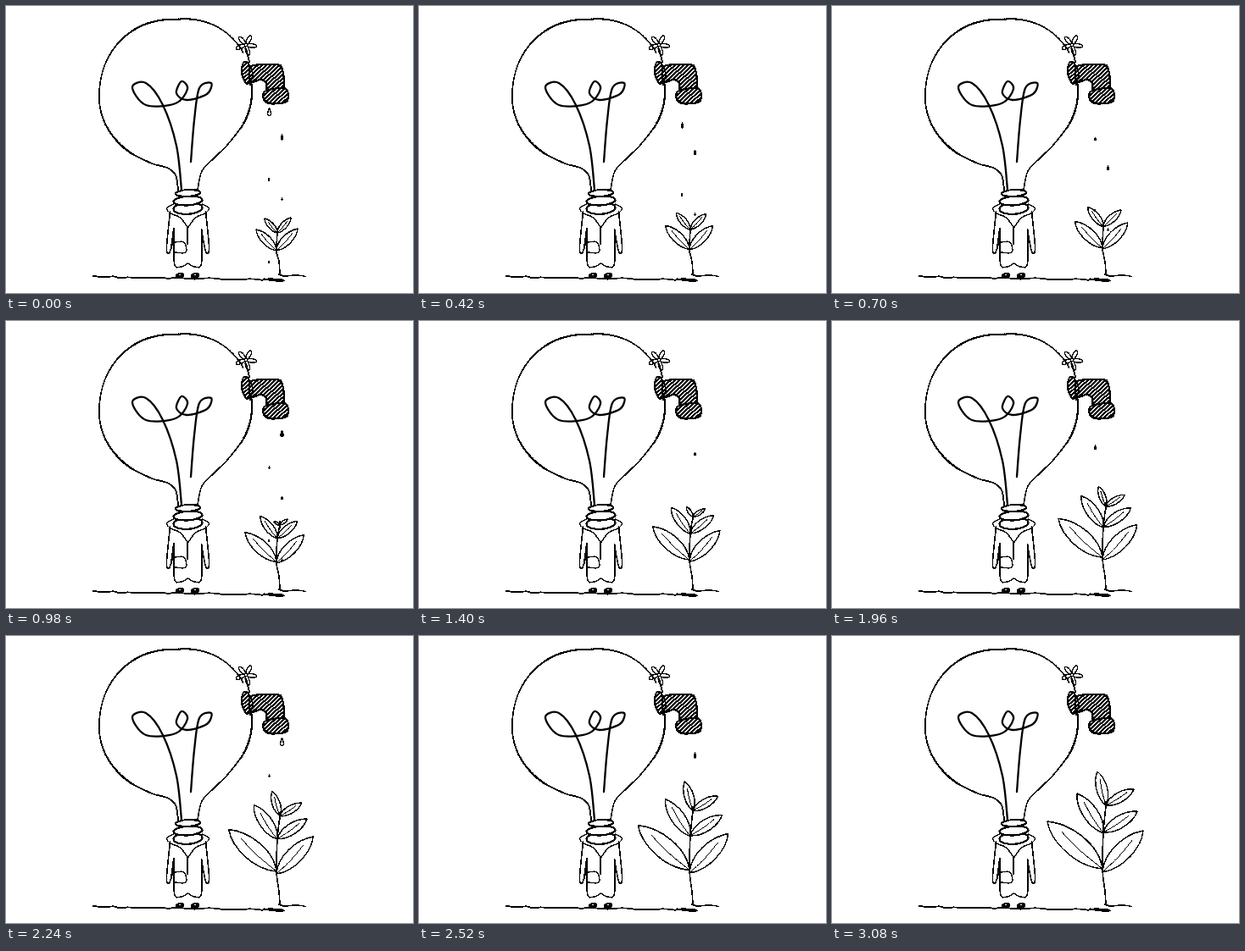
An HTML page with a canvas that plays this animation: 480x339 px, repeating every 3.22 s.

```html
<!DOCTYPE html>
<html lang="en">
<head>
<meta charset="utf-8">
<title>Bulb watering a plant</title>
<style>
html, body { margin: 0; width: 100%; height: 100%; overflow: hidden; background: #fff; }
canvas { display: block; width: 480px; height: 339px; }
</style>
</head>
<body>
<canvas id="c" width="480" height="339"></canvas>
<script>
const W = 480, H = 339, LOOP = 3220, STEP = 140;
const GROWN = 19;   // step at which the plant is full size
const PERIOD = 5;   // steps between two drops
const FALL = 8;     // pixels a drop falls per step

function makeContext(canvas) {
  canvas.width = W;
  canvas.height = H;
  const g = canvas.getContext('2d', { willReadFrequently: true });
  g.fillStyle = '#fff';
  g.fillRect(0, 0, W, H);
  g.strokeStyle = '#000';
  g.lineCap = g.lineJoin = 'round';
  return g;
}

function seeded(seed) {
  return () => (seed = seed * 16807 % 2147483647) / 2147483647;
}

// Smooth curve through a list of [x, y] points
function trace(g, p, closed) {
  const n = p.length;
  const at = i => closed ? p[(i + n) % n] : p[Math.max(0, Math.min(n - 1, i))];
  g.beginPath();
  g.moveTo(...p[0]);
  for (let i = 0; i < (closed ? n : n - 1); i++) {
    const a = at(i - 1), b = at(i), c = at(i + 1), d = at(i + 2);
    g.bezierCurveTo(b[0] + (c[0] - a[0]) / 6, b[1] + (c[1] - a[1]) / 6,
      c[0] - (d[0] - b[0]) / 6, c[1] - (d[1] - b[1]) / 6, ...c);
  }
}

function line(g, p, width, closed = false) {
  trace(g, p, closed);
  g.lineWidth = width;
  g.stroke();
}

function oval(g, x, y, rx, ry, turn, fill, width) {
  g.beginPath();
  g.ellipse(x, y, rx, ry, turn, 0, 2 * Math.PI);
  if (fill) { g.fillStyle = fill; g.fill(); }
  g.lineWidth = width;
  g.stroke();
}

// Turns soft edges into hard black ink
function harden(g, x, y, w, h) {
  const img = g.getImageData(x, y, w, h), d = img.data;
  for (let i = 0; i < d.length; i += 4)
    d[i] = d[i + 1] = d[i + 2] = d[i] < 140 ? 0 : 255;
  g.putImageData(img, x, y);
}

// Slightly lopsided circle of the bulb
function rim(a) {
  const s = Math.sin(2 * a);
  const r = 1 + Math.abs(s) * (.01 - .036 * Math.sin(a)) - .0195 * s;
  return [200 + 90 * r * Math.cos(a), 103 + 87 * r * Math.sin(a)];
}

function drawRim(g, from, to) {
  for (let a = from; a < to; a += .05)
    line(g, [rim(a), rim(Math.min(to, a + .05))], 1.8 + .4 * Math.sin(3 * a + 1));
}

function drawBulb(g) {
  const left = 2.15, right = .5;
  drawRim(g, left, 2 * Math.PI - .56);
  drawRim(g, -.12, right);
  line(g, [rim(left), [172, 186], [190, 191], [200, 200], [203, 217]], 1.8);
  line(g, [rim(right), [262, 163], [245, 180], [231, 195], [226, 217]], 1.6);
  for (let i = 2; i >= 0; i--)
    oval(g, 214.5, 221 + 9 * i, 14.5 + Math.min(i, 1) * 2.5, 4 + i * 1.4, -.06, '#fff', 2.2);
}

function drawFilament(g) {
  line(g, [[207, 217], [201, 165], [185, 117], [165, 91], [149, 96], [165, 117],
    [200, 115], [214, 98], [207, 89], [201, 103], [213, 111], [237, 104],
    [242, 91], [228, 97], [222, 135], [218, 184]], 2.3);
}

// The coat is symmetric, so each line is drawn twice
function drawCoat(g) {
  for (const side of [-1, 1]) {
    const half = (pts, width) => line(g, pts.map(([x, y]) => [214.5 + side * x, y]), width);
    half([[17, 234], [25, 239], [20, 245], [9, 250], [0, 262]], 1.4);
    half([[21, 243], [25, 286], [21, 290], [16, 264]], 1.5);
    half([[16, 264], [16, 304], [8, 308], [0, 304]], 1.4);
    oval(g, 214 + side * 9, 318.5, 5, 3, -.2, '#000', 1.2);
    g.fillStyle = '#fff';
    g.fillRect(213 + side * 9, 317, 2, 1);
  }
  line(g, [[198, 263], [195, 286]], 2);
  line(g, [[214, 262], [214, 282]], 1.4);
  line(g, [[198, 279], [210, 279], [212, 291], [199, 291]], 1.4);
}

function hatched(g, pts) {
  g.save();
  trace(g, pts, true);
  g.fillStyle = '#fff';
  g.fill();
  g.clip();
  for (let x = 200; x < 360; x += 5.2) line(g, [[x, 120], [x + 66, 60]], 2.1);
  g.restore();
  line(g, pts, 2, true);
}

function drawTap(g) {
  hatched(g, [[286, 72], [318, 69], [326, 75], [327, 100], [309, 101], [307, 91], [300, 87], [287, 90]]);
  hatched(g, [[305, 101], [328, 97], [333, 105], [329, 114], [307, 114]]);
  hatched(g, [[280, 67], [286, 68], [287, 86], [284, 92], [278, 80]]);
  line(g, [[287, 70], [291, 80], [288, 93]], 1.6);
  line(g, [[283, 50], [287, 66]], 1.6);
  for (let i = 0; i < 5; i++) {
    const a = 2.8 + 1.2 * i;
    oval(g, 283 + 7 * Math.cos(a), 46 + 7 * Math.sin(a), 5.5, 2.3, a, null, 1.3);
  }
}

function rough(g, x0, y0, x1, y1, width, seed) {
  const rnd = seeded(seed), pts = [];
  for (let x = x0; x <= x1; x += 8)
    pts.push([x, y0 + (y1 - y0) * (x - x0) / (x1 - x0) + (rnd() - .5) * 2]);
  line(g, pts, width);
}

const scene = document.createElement('canvas');
{
  const g = makeContext(scene);
  rough(g, 103, 320, 327, 323.5, 1.8, 11);
  rough(g, 304, 323, 328, 325, 1.5, 5);
  rough(g, 321, 318, 353, 319, 1.4, 7);
  drawBulb(g);
  drawCoat(g);
  drawTap(g);
  harden(g, 0, 0, W, H);
  drawFilament(g);
}

// Each leaf: first step, then tip x, tip y and base y when young and when grown
const leaves = [
  { born: 0, young: [295, 264, 289], grown: [254, 219, 275] },
  { born: 0, young: [344, 263, 289], grown: [367, 230, 279] },
  { born: 0, young: [305, 251, 268], grown: [289, 186, 233] },
  { born: 0, young: [336, 250, 268], grown: [360, 207, 232] },
  { born: 6, young: [316, 237, 241], grown: [313, 160, 200] },
  { born: 6, young: [332, 234, 241], grown: [356, 181, 200] }
];

function drawLeaf(x, y, tx, ty) {
  const dx = tx - x, dy = ty - y, side = dx < 0 ? 1 : -1;
  const at = (u, v) => [x + dx * u - dy * v * side, y + dy * u + dx * v * side];
  ctx.beginPath();
  ctx.moveTo(x, y);
  ctx.bezierCurveTo(...at(.25, .22), ...at(.72, .2), tx, ty);
  ctx.bezierCurveTo(...at(.78, -.18), ...at(.3, -.22), x, y);
  ctx.fillStyle = '#fff';
  ctx.fill();
  ctx.lineWidth = 1.4;
  ctx.stroke();
  if (Math.hypot(dx, dy) > 16) line(ctx, [[x, y], at(.4, -.01), at(.76, .02)], 1);
}

function drawPlant(n) {
  const stem = [[323, 317], [322, 302]];
  leaves.forEach(({ born, young, grown }, i) => {
    if (n < born) return;
    const k = Math.min(1, (n - born) / (GROWN - born));
    const [tx, ty, y] = young.map((v, j) => v + (grown[j] - v) * k);
    const x = [319, 320, 323][i >> 1];
    drawLeaf(x, y, tx, ty);
    if (i % 2) return;
    stem.push([x, y]);
    line(ctx, [[x, y + 3], [x, y - 4]], 2);
  });
  line(ctx, stem, 1.5);
}

function drawDrop(x, y, h) {
  const w = h * .55;
  ctx.beginPath();
  ctx.moveTo(x, y - h);
  ctx.bezierCurveTo(x + w * .5, y - h * .2, x + w * 1.5, y + h, x, y + h);
  ctx.bezierCurveTo(x - w * 1.5, y + h, x - w * .5, y - h * .2, x, y - h);
  ctx.fillStyle = h > 3.9 ? '#fff' : '#000';
  ctx.fill();
  ctx.lineWidth = 1.3;
  ctx.stroke();
}

function drawDrops(n) {
  // drops already in the air when the loop begins
  if (n < 8) [155, 205, 228, 302].forEach((y, i) => {
    y += n * 9;
    if (y < 312) drawDrop(i % 2 ? 310 : 325.5, y, Math.max(1, 3 - (y - 155) / 40));
  });
  for (let k = 0; k < 4; k++) {
    const age = n - k * PERIOD;
    if (age >= 0 && age <= PERIOD + 1 && n <= 20)
      drawDrop(k % 2 ? 325.5 : 310.5, 125 + age * FALL, Math.max(1, 4.5 - .75 * age));
  }
}

const ctx = makeContext(document.getElementById('c'));

function frame(now) {
  const n = Math.max(0, Math.floor(now % LOOP / STEP) - 1);
  ctx.drawImage(scene, 0, 0);
  drawPlant(n);
  drawDrops(n);
  harden(ctx, 250, 115, 125, 205);
  requestAnimationFrame(frame);
}
frame(performance.now());
</script>
</body>
</html>
```
